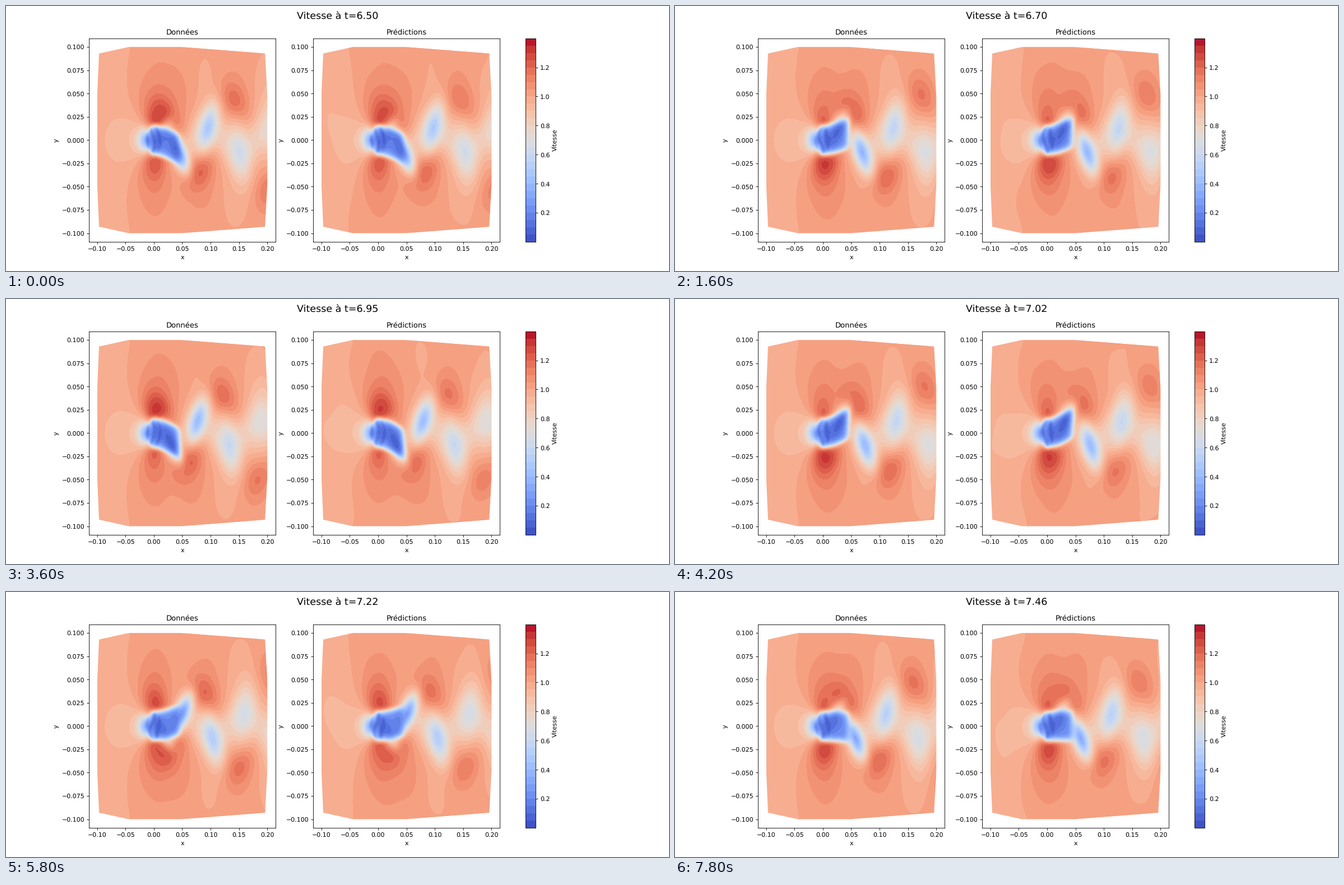
These frames come from a looping animation (1183x473 px, 8 s). A matplotlib script:

```python
import numpy as np
import matplotlib.pyplot as plt
from matplotlib.animation import FuncAnimation
from matplotlib.patches import Polygon

W, H, DPI = 1183, 473, 78.875
FRAMES, INTERVAL = 40, 200
DT = 0.0246                      # simulated seconds per frame
WAVELENGTH, SPEED = 0.113, 0.724
K = 2 * np.pi / WAVELENGTH
LEVELS = np.linspace(0, 1.4, 29)

x, y = np.meshgrid(np.linspace(-0.1, 0.2, 200), np.linspace(-0.1, 0.1, 170))


def sigmoid(v):
    return 1 / (1 + np.exp(-v))


def smoothstep(v, lo, hi):
    u = np.clip((v - lo) / (hi - lo), 0, 1)
    return u * u * (3 - 2 * u)


def glide(v, start, width):
    """Rest near zero, then leave smoothly at unit slope."""
    return width * np.log1p(np.exp((v - start) / width))


def bump(cx, cy, w, h, power=2, tilt=0):
    dy = y - cy
    dx = x - cx - tilt * dy
    return np.exp(-np.abs(dx / w) ** power - np.abs(dy / h) ** power)


def free_stream():
    """Speed around the cylinder without any wake."""
    r2 = x**2 + y**2 + 0.0002
    fade = np.exp(-(np.maximum(x, 0) / 0.04) ** 2)
    u = -0.00021 * (x**2 - y**2) / r2**2 * fade
    v = -0.00042 * x * y / r2**2 * fade
    base = 0.975 + 0.037 * sigmoid((x + 0.03) / 0.015)
    sides = bump(0.03, 0.045, 0.06, 0.035) + bump(0.03, -0.045, 0.06, 0.035)
    return np.hypot(base + u, v) + 0.045 * sides


STREAM = free_stream()
DISK = np.exp(-(np.hypot(x, y) / 0.0145) ** 8)
FRONT = 1 - 0.58 * bump(-0.012, 0, 0.014, 0.012)
BAND = 0.04 * np.exp(-((np.abs(y) - 0.05) / 0.04) ** 2) * sigmoid((x - 0.03) / 0.02)
WAKE_START = sigmoid((x - 0.05) / 0.01)


def vortex(age, side):
    """Fast patch outside the wake and slow patch inside it."""
    birth = smoothstep(age, -0.05, 0.035)
    drift = glide(age, 0.03, 0.012)
    fast = 0.3 * birth * np.exp(-drift / 0.18) * bump(
        0.008 + 1.1 * drift, -side * (0.02 + 0.18 * drift),
        0.022, 0.02, tilt=side * 0.4)
    slow = 0.75 * birth * np.exp(-max(age - 0.04, 0) / 0.1) * bump(
        0.012 + glide(age, 0.012, 0.02),
        side * 0.013 * smoothstep(age, -0.06, 0.05),
        0.013 + 0.05 * drift, 0.018 + 0.12 * drift,
        tilt=side * 0.65 * np.exp(-drift / 0.1))
    return fast, slow


def speed_field(n, gain=1.0, shift=0.0, wobble=0.0):
    head = (0.095 + shift + SPEED * DT * n) % WAVELENGTH
    fast = STREAM - np.sign(y) * gain * BAND * np.cos(K * (x - head + 0.008))
    ribbon = np.exp(-((y - 0.012 * np.cos(K * (x - head))) / 0.024) ** 2)
    slow = FRONT * (1 - 0.16 * ribbon * WAKE_START)

    for i in range(-2, 6):
        f, s = vortex(head + i * WAVELENGTH / 2, 1 if i % 2 == 0 else -1)
        fast = fast + gain * f
        slow = slow * (1 - s)

    # Recirculation zone swaying behind the cylinder
    sway = -0.012 * np.cos(K * (head - 0.085)) * (np.maximum(x, 0) / 0.045) ** 1.5
    core = bump(0.02, sway, 0.026, 0.0165, power=6)
    streaks = np.sin(500 * x + 2 * np.sin(150 * y + K * head))
    slow = slow * (1 - 0.78 * core) * (1 - 0.5 * DISK) * (1 + 0.25 * DISK * streaks)

    ripple = (np.sin(38 * x + 24 * y + 0.7 * n)
              + np.sin(61 * y - 29 * x + 0.45 * n)
              + 0.5 * np.sin(110 * x + 70 * y - 0.9 * n))
    fast = 1 + 0.45 * np.tanh((fast + wobble * ripple - 1) / 0.45)
    return np.clip(fast * slow, 0.07, 1.39)


PANELS = [("Données", {}),
          ("Prédictions", dict(gain=0.85, shift=0.002, wobble=0.004))]

corner = [(-.0997, .05), (-.0967, .093), (-.0444, .1),
          (.0475, .1), (.196, .093), (.2, .0475)]
OUTLINE = corner + [(px, -py) for px, py in reversed(corner)]

plt.rcParams["text.hinting"] = "no_hinting"
fig, axes = plt.subplots(1, 2, figsize=((W + 1e-6) / DPI, (H + 1e-6) / DPI),
                         dpi=DPI, gridspec_kw=dict(top=0.878))
title = fig.suptitle("", fontsize=16)
clips, fills = [], []


def draw_panel(ax, clip, n, options):
    fill = ax.contourf(x, y, speed_field(n, **options), levels=LEVELS,
                       cmap="coolwarm", vmin=0, vmax=1.4)
    fill.set_clip_path(clip)
    return fill


for ax, (name, options) in zip(axes, PANELS):
    ax.set(title=name, xlabel="x", ylabel="y",
           xlim=(-0.1146, 0.2148), ylim=(-0.1093, 0.1093))
    clip = Polygon(OUTLINE, closed=True, transform=ax.transData)
    clips.append(clip)
    fills.append(draw_panel(ax, clip, 0, options))
    # Thin slivers along the slanted edges
    for s in (1, -1):
        ax.add_patch(Polygon([(.0475, s * .1), (.196, s * .093), (.12, s * .0953)],
                             color=plt.cm.coolwarm(1.025 / 1.4), lw=0, zorder=2))

fig.colorbar(fills[0], ax=list(axes), label="Vitesse",
             ticks=np.arange(0.2, 1.3, 0.2), format="%.1f")


def update(n):
    title.set_text(f"Vitesse à t={6.503 + DT * n:.2f}")
    for i, (ax, (_, options)) in enumerate(zip(axes, PANELS)):
        fills[i].remove()
        fills[i] = draw_panel(ax, clips[i], n, options)
    return [title, *fills]


anim = FuncAnimation(fig, update, frames=FRAMES, interval=INTERVAL,
                     init_func=lambda: [], repeat=True, repeat_delay=0)
plt.show()
```
